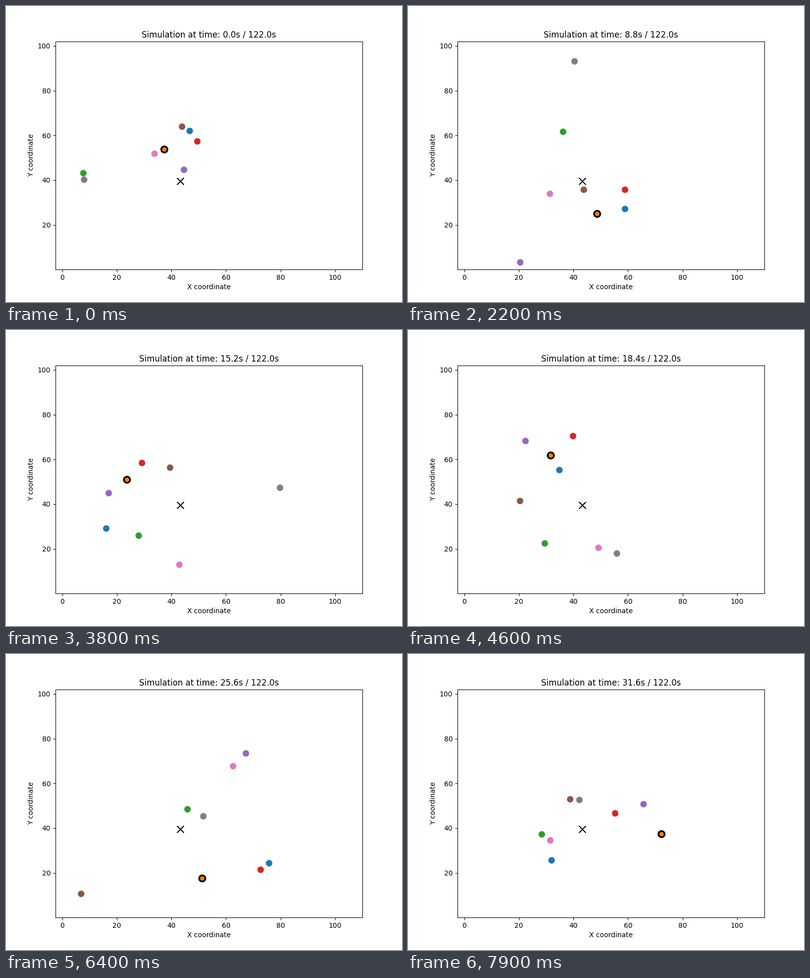
Write a matplotlib script that moves like this. It is 800 px wide and 600 px high and loops after 8 s.

```python
import numpy as np
import matplotlib.pyplot as plt
from matplotlib.animation import FuncAnimation

FRAMES, STEP, TOTAL = 80, 0.4, 122.0
CROSS = 43.3 + 39.5j
SPRING = 0.006      # pull towards the cross, per frame squared
FLOOR = 1.6         # lowest y a dot can reach
LEADER = "tab:orange"

# Waypoints as x + yj, one per key time
KEYS = [0, 10, 22, 38, 53, 64, 79]
WAYPOINTS = {
    "tab:blue": [46.7+62j, 62.1+54.3j, 58.9+27.1j, 16.1+29.1j, 62.4+62j, 75.8+24.3j, 32+25.6j],
    "tab:orange": [37.4+53.7j, 56+44j, 48.7+24.9j, 23.7+50.9j, 42.7+52.9j, 51.3+17.5j, 72.3+37.3j],
    "tab:green": [7.7+43.1j, 4.4+59.5j, 36.2+61.6j, 28+25.9j, 37.9+31.3j, 45.9+48.4j, 28.4+37.2j],
    "tab:red": [49.5+57.3j, 59.3+45j, 58.9+35.7j, 29.2+58.4j, 58.2+62.1j, 72.7+21.4j, 55.3+46.6j],
    "tab:purple": [44.6+44.6j, 34.2+26.8j, 20.5+3.2j, 17+44.9j, 35.8+77.6j, 67.3+73.4j, 65.7+50.7j],
    "tab:brown": [43.9+63.9j, 41.4+41.7j, 43.8+35.7j, 39.5+56.3j, 5.4+21.1j, 6.9+10.6j, 38.8+52.9j],
    "tab:pink": [33.8+51.8j, 48+51.5j, 31.4+33.9j, 42.9+12.9j, 54.4+38.8j, 62.6+67.7j, 31.5+34.5j],
    "tab:gray": [8+40.2j, 3.6+67.4j, 40.4+93.1j, 79.8+47.3j, 38.1+13.5j, 51.7+45.3j, 42.2+52.6j],
}


def spring_paths(points):
    """Paths through the waypoints that deviate least from free spring motion."""
    eye = np.eye(FRAMES)
    motion = eye[2:] + eye[:-2] + (SPRING - 2) * eye[1:-1]
    weight = 1000
    lhs = np.vstack([motion, weight * eye[KEYS]])
    rhs = np.vstack([np.zeros((FRAMES - 2, points.shape[1])),
                     weight * (points - CROSS)])
    paths = CROSS + np.linalg.lstsq(lhs, rhs, rcond=None)[0]
    return np.stack([paths.real, np.maximum(paths.imag, FLOOR)], axis=-1)


paths = spring_paths(np.array(list(WAYPOINTS.values())).T)
colours = list(WAYPOINTS)

fig, ax = plt.subplots(figsize=(8, 6), dpi=100)
ax.set(xlim=(-2.5, 110), ylim=(0.06, 101.96),
       xlabel="X coordinate", ylabel="Y coordinate")
title = ax.set_title("")
dots = ax.scatter(*paths[0].T, s=80, c=colours,
                  edgecolors=["black" if c == LEADER else c for c in colours],
                  linewidths=[2.5 if c == LEADER else 0.5 for c in colours])
ax.scatter(CROSS.real, CROSS.imag, s=100, c="black", marker="x")


def draw(i):
    dots.set_offsets(paths[i])
    title.set_text(f"Simulation at time: {i * STEP:.1f}s / {TOTAL}s")
    return dots, title


anim = FuncAnimation(fig, draw, frames=FRAMES, interval=100, repeat=True,
                     repeat_delay=0, blit=False)
plt.show()
```
